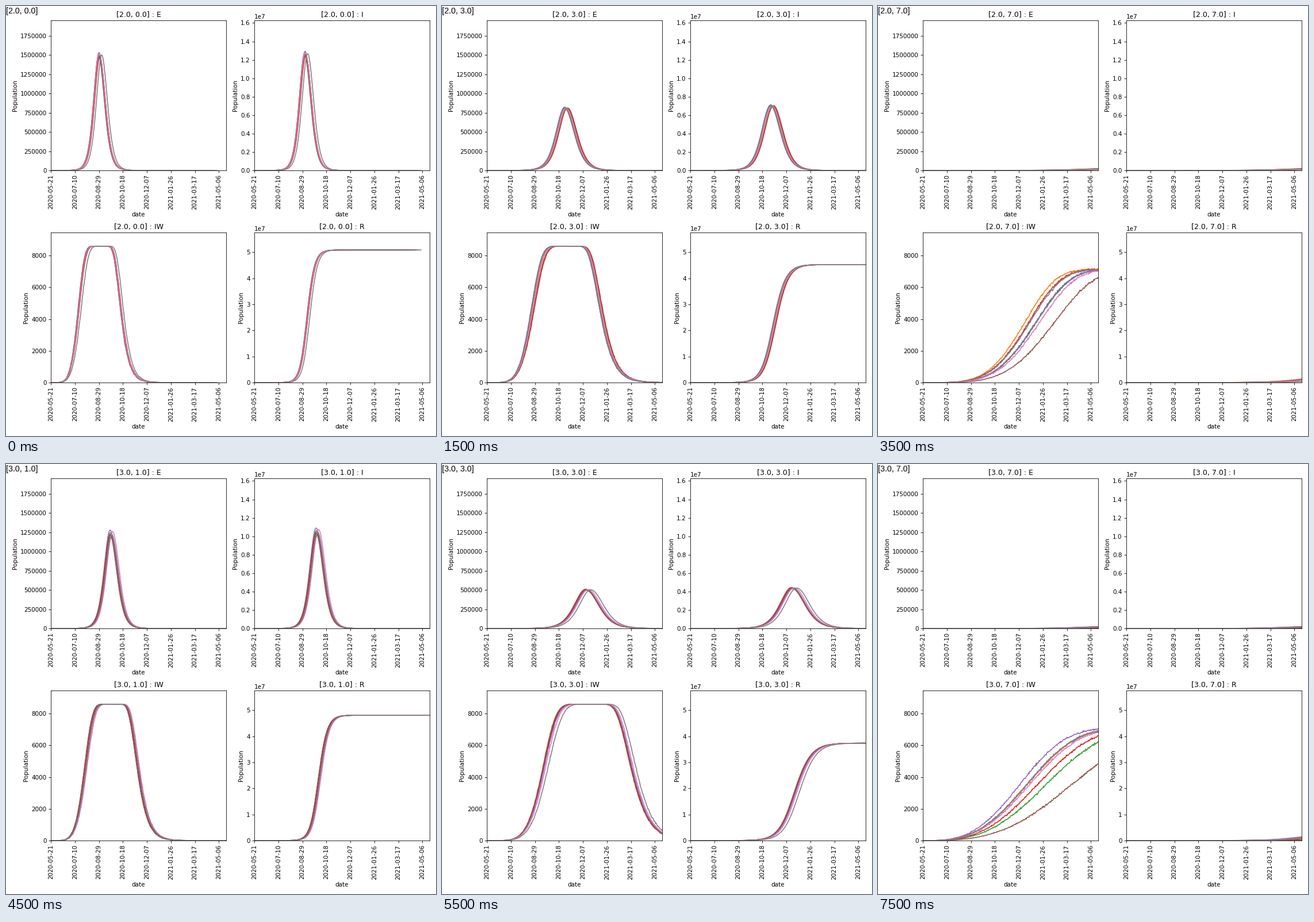
A matplotlib script that plays this animation: 748 by 748 pixels, repeating every 8 s.

```python
import numpy as np
import matplotlib.pyplot as plt
from matplotlib.animation import FuncAnimation

SIZE, DPI = 748, 74.8
DAYS = np.arange(366)
COLORS = plt.rcParams["axes.prop_cycle"].by_key()["color"][:8]
STEPS = [(a, b) for a in (2, 3) for b in range(8)]
WARDS = 8588
SIGMA = 1.1    # daily rate of leaving E
STAY = 8.8     # ratio of I to E


def simulate(a, b):
    """Return the E, I, IW and R series of the eight runs."""
    rng = np.random.default_rng(100 * a + b)
    s = b + .09 * (a - 2) * b * (7 - b)    # strength of the measures, 0 to 7
    extreme = (s / 7) ** 12

    high = 1.48e6 * (1 - (s / 7.1) ** 1.5) ** 1.97 + 2.2e4
    total = (5.1e7 - 3.62e5 * s ** 2.5) * (1 - .035 * (a - 2))
    peak = min(101 + 14 * s + .76 * s ** 3, 390)
    rate = 4 * high * SIGMA / total
    fast, slow = 1.06 * rate, .95 * rate
    spread = 1.6 * (peak / 101) ** 1.8

    cap = WARDS * (1 - .17 * extreme)
    power = 5.5 - 1.2 * (a - 1) * extreme

    def exposed(x):
        return high / np.cosh(np.where(x < 0, fast, slow) * x / 2) ** 2

    def removed(x):
        left = (1 + np.tanh(fast * np.minimum(x, 0) / 2)) / fast
        right = np.tanh(slow * np.maximum(x, 0) / 2) / slow
        return 2 * high * SIGMA * (left + right)

    def infected_wards(delay):
        up = 1 - .5 ** ((DAYS / (.565 * peak + delay)) ** power)
        left = (1.46 * peak + delay - DAYS) / (.115 * peak)
        down = 1 - np.exp(-np.exp(np.clip(left - .37, -30, 30)))
        w = cap * up * down
        noise = .7 * np.sqrt(w * (1 - w / WARDS)) * rng.normal(size=DAYS.size)
        return np.maximum(np.round(w + noise), 0)

    runs = []
    for _ in COLORS:
        delay = spread * (rng.gamma(2) - 1.6) / 1.4
        boost = 1 + .015 * rng.normal()
        x = DAYS - peak - delay
        series = [boost * exposed(x),
                  boost * STAY * np.mean([exposed(x - lag) for lag in range(11)], 0),
                  infected_wards(delay),
                  removed(x - 9)]
        if b == 0:    # fast outbreaks die out before the year is over
            end = rng.uniform(310, 350)
            series = [np.where(DAYS <= end, y, np.nan) for y in series]
        runs.append(series)
    return runs


def panel(left, top, ymax, step):
    ax = fig.add_axes([left / SIZE, 1 - (top + 261) / SIZE,
                       305 / SIZE, 261 / SIZE])
    ax.set(xlim=(0, 365), ylim=(0, ymax), xlabel="date", ylabel="Population",
           yticks=np.arange(0, ymax, step))
    ax.set_xticks(range(0, 351, 50), dates, rotation=90)
    lines = [ax.plot([], [], color=c, lw=1.5)[0] for c in COLORS]
    return ax, lines


fig = plt.figure(figsize=(10, 10), dpi=DPI, facecolor="white")
dates = [str(np.datetime64("2020-05-21") + 50 * k) for k in range(8)]
panels = {
    "E": panel(78, 25, 1.948e6, 250000),
    "I": panel(432, 25, 1.628e7, 2e6),
    "IW": panel(78, 394, 9448, 2000),
    "R": panel(432, 394, 5.76e7, 1e7),
}
for name in ("E", "IW"):
    panels[name][0].yaxis.set_major_formatter("{x:.0f}")

header = fig.text(0, 1 - 13.3 / SIZE, "", family="Liberation Sans", size=13.7,
                  va="baseline", color="black")


def draw(n):
    a, b = STEPS[n]
    label = f"[{a}.0, {b}.0]"
    header.set_text(label)
    runs = simulate(a, b)
    for j, (name, (ax, lines)) in enumerate(panels.items()):
        ax.set_title(f"{label} : {name}", y=1.0)
        for line, run in zip(lines, runs):
            line.set_data(DAYS, run[j])
    return []


anim = FuncAnimation(fig, draw, frames=len(STEPS), interval=500,
                     repeat=True, repeat_delay=0, blit=False)
plt.show()
```
